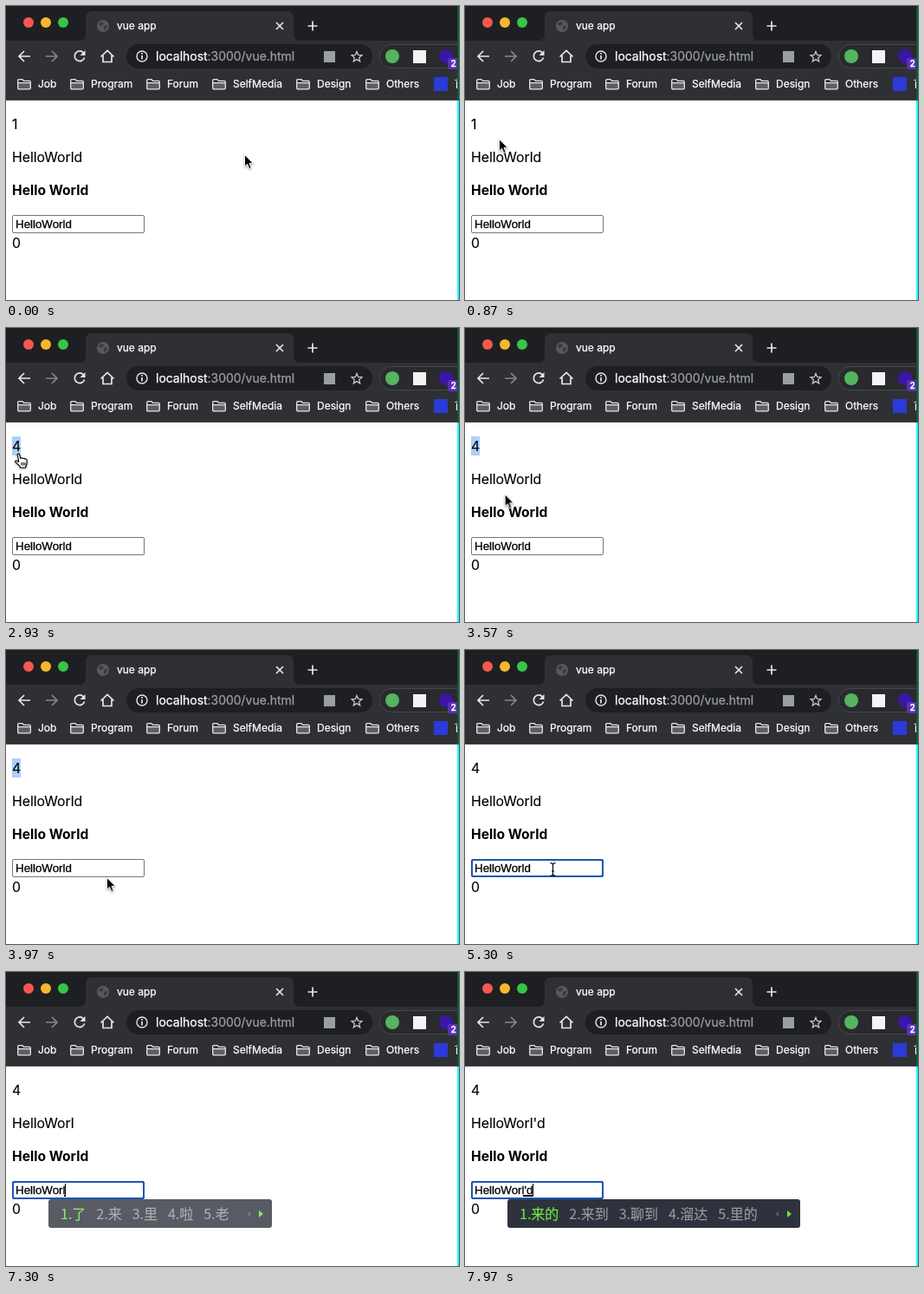
An HTML page that plays this animation: 523 by 339 pixels, repeating every 8 s.

```html
<!DOCTYPE html>
<html lang="en">
<head>
<meta charset="utf-8">
<title>vue app</title>
<style>
html, body { margin: 0; width: 100%; height: 100%; overflow: hidden; background: #fff; }
body { position: relative; font: 15.8px/22px Inter, sans-serif; color: #000; -webkit-text-stroke: .15px; }
svg { display: block; overflow: visible; }
.chrome { position: absolute; left: 0; top: 0; -webkit-text-stroke: 0; }
.chrome text { font: 12px Inter, "Noto Sans CJK SC", sans-serif; fill: #fff; stroke: #fff; stroke-width: .25px; }
.chrome .url { font-size: 13.95px; }
.chrome .path { fill: #9b9ea3; stroke: #9b9ea3; }
.line { fill: none; stroke: #e6e7e9; stroke-width: 1.7; }
.row, .input, .ring, .caret, .ime, .under, .hl, .count { position: absolute; white-space: pre; }
.row { left: 7px; }
.title { font-size: 15.6px; font-weight: 700; -webkit-text-stroke: 0; }

/* every animated part shares one 8 s clock; most change in hard steps */
.count, .hl, .l, .d, .ad, .input, .ring, .caret, .under, .ime, .ptr, .ptr svg {
  animation: 8s step-end infinite;
}

.count { left: 0; top: 0; }
.hl { left: 0; top: -1px; width: 10px; height: 22px; background: #acd0f8; animation-name: hl; }
.c1 { animation-name: c1; } .c2 { animation-name: c2; }
.c3 { animation-name: c3; } .c4 { animation-name: c4; }
@keyframes c1 { 0% { opacity: 1 } 22.875%, to { opacity: 0 } }
@keyframes c2 { 0% { opacity: 0 } 22.875% { opacity: 1 } 29.125%, to { opacity: 0 } }
@keyframes c3 { 0% { opacity: 0 } 29.125% { opacity: 1 } 35.875%, to { opacity: 0 } }
@keyframes c4 { 0% { opacity: 0 } 35.875%, to { opacity: 1 } }
@keyframes hl { 0% { opacity: 0 } 36.25% { opacity: 1 } 54.125%, to { opacity: 0 } }

.l { animation-name: l; } .d { animation-name: d; }
.ad { position: absolute; animation-name: ad; }
@keyframes l { 0% { opacity: 1 } 75.875% { opacity: 0 } 87.875%, to { opacity: 1 } }
@keyframes d { 0% { opacity: 1 } 73.75%, to { opacity: 0 } }
@keyframes ad { 0% { opacity: 0 } 99.125%, to { opacity: 1 } }

.input {
  left: 7px; top: 241px; width: 153px; height: 21px; box-sizing: border-box;
  padding: 2px 3px; border: 1px solid #767676; border-radius: 2px; background: #fff;
  font: 13.333px/15px "Liberation Sans", Arial, sans-serif; -webkit-text-stroke: .3px; animation-name: hover;
}
@keyframes hover {
  0% { border-color: #767676 } 45.5% { border-color: #484848 }
  46.75% { border-color: #767676 } 50%, to { border-color: #484848 }
}
.ring {
  left: 7px; top: 241px; width: 149px; height: 17px;
  border: 2px solid #1b56b6; border-radius: 3px;
  animation-name: ring; animation-timing-function: linear;
}
@keyframes ring { 0%, 54.125% { opacity: 0 } 55.875%, to { opacity: 1 } }

.caret { left: 0; top: 244px; width: 1px; height: 15px; background: #000; animation-name: blink, caret; }
@keyframes blink {
  0% { opacity: 0 } 55.875% { opacity: 1 } 66.25% { opacity: 0 } 72.5% { opacity: 1 }
  78.75% { opacity: 0 } 85% { opacity: 1 } 94.125% { opacity: 0 } 99.125%, to { opacity: 1 }
}
@keyframes caret {
  0% { transform: translateX(76px) } 73.75% { transform: translateX(68px) }
  75.875% { transform: translateX(66px) } 87.875% { transform: translateX(68px) }
  99.125%, to { transform: translateX(78px) }
}
.under { left: 67px; top: 257px; height: 1.6px; background: #000; animation-name: under; }
@keyframes under { 0% { width: 0 } 87.875% { width: 2px } 99.125%, to { width: 11px } }

.ime {
  left: 49px; top: 262px; width: 338px; height: 33px; box-sizing: border-box;
  padding-left: 14px; display: flex; gap: 12px; border-radius: 3px; background: #2e323c; color: #96989d;
  font: 16px/33px "Noto Sans CJK SC", sans-serif; animation-name: wide;
}
.ime b { font-weight: 500; color: #6ee83c; }
.ime svg { position: absolute; right: 9px; top: 13px; }
.ime.short { width: 258px; animation-name: short; animation-timing-function: linear; }
@keyframes short {
  0%, 87.875% { opacity: 0; animation-timing-function: ease-out }
  93.375% { opacity: 1; animation-timing-function: step-end }
  99.625%, to { opacity: 0 }
}
@keyframes wide { 0% { opacity: 0 } 99.625%, to { opacity: 1 } }

.ptr { position: absolute; left: 0; top: 0; animation-name: move; animation-timing-function: linear; }
.ptr svg { position: absolute; left: 0; top: 0; filter: drop-shadow(0 1px 1px #0006); }
.ptr .arrow { animation-name: arrow; }
.ptr .hand { animation-name: hand; }
.ptr .beam { animation-name: beam; filter: none; }
@keyframes move {
  0% { transform: translate(275px, 171px) }
  6.25% { transform: translate(275px, 171px); animation-timing-function: cubic-bezier(.4, .1, .6, 1) }
  10.875% { transform: translate(39px, 153px); animation-timing-function: ease-out }
  15.4% { transform: translate(22px, 148px) }
  16.25% { transform: translate(17px, 145px) }
  17.125%, 43.375% { transform: translate(14px, 145px) }
  43.8% { transform: translate(17px, 148px) }
  45.5% { transform: translate(75px, 236px) }
  46.75% { transform: translate(110px, 262px) }
  47.5%, 49.3% { transform: translate(117px, 264px) }
  49.625% { transform: translate(116px, 262px) }
  51.25%, to { transform: translate(101px, 253px) }
}
@keyframes arrow {
  0% { opacity: 1 } 15.4% { opacity: 0 } 43.8% { opacity: 1 }
  45.5% { opacity: 0 } 46.75% { opacity: 1 } 50%, to { opacity: 0 }
}
@keyframes hand { 0% { opacity: 0 } 15.4% { opacity: 1 } 43.8%, to { opacity: 0 } }
@keyframes beam {
  0% { opacity: 0 } 45.5% { opacity: 1 } 46.75% { opacity: 0 }
  50% { opacity: 1 } 73.75%, to { opacity: 0 }
}
</style>
</head>
<body>
<svg class="chrome" width="523" height="339" viewBox="0 0 523 339">
  <defs>
    <g id="folder">
      <path fill="#e6e7e9" opacity=".25" d="M.7 4.6H15.3V11.8H.7Z"/>
      <path class="line" style="stroke-width:1.3" d="M.7 10.5V2Q.7.7 2 .7H6L7.6 2.4H14Q15.3 2.4 15.3 3.7V10.5Q15.3 11.8 14 11.8H2Q.7 11.8.7 10.5ZM.7 4.6H15.3"/>
    </g>
  </defs>
  <rect width="523" height="40" fill="#1e1f22"/>
  <rect y="40" width="523" height="69" fill="#2f3034"/>
  <rect y="108" width="523" height="1" fill="#46484c"/>
  <path fill="#2f3034" d="M84 40Q92 40 92 32V14Q92 6 100 6H324Q332 6 332 14V32Q332 40 340 40Z"/>
  <circle cx="26" cy="19" r="6" fill="#f6574e"/>
  <circle cx="46" cy="19" r="6" fill="#f5b72e"/>
  <circle cx="66" cy="19" r="6" fill="#35c648"/>

  <circle cx="112" cy="23" r="7" fill="#56585c"/>
  <path fill="#38393d" d="M107 20L111 18 113 20 110 23 108 22ZM113 23L117 22 116 26 113 28Z"/>
  <text x="128" y="27">vue app</text>
  <path class="line" d="M312 19L320 27M320 19L312 27"/>
  <path class="line" d="M348.5 23H359.5M354 17.5V28.5"/>

  <path class="line" d="M28 58H15.5M21 52L15 58 21 64"/>
  <path class="line" style="stroke:#85878b" d="M46 58H58.5M53 52L59 58 53 64"/>
  <path class="line" d="M89.5 54A5.8 5.8 0 1 0 90.6 59.5"/>
  <path fill="#e6e7e9" d="M91.5 51V57H85.5Z"/>
  <path class="line" d="M109.5 58.5L117 51.5 124.5 58.5M112 57V64.5H122V57"/>

  <rect x="139" y="44" width="284" height="28" rx="14" fill="#1e1f22"/>
  <circle class="line" style="stroke-width:1.4" cx="157" cy="58" r="6"/>
  <path class="line" d="M157 57V61.5M157 54V55.7"/>
  <text class="url" x="173" y="63">localhost<tspan class="path">:3000/vue.html</tspan></text>
  <rect x="367" y="52" width="13" height="13" fill="#9a9da2"/>
  <path class="line" style="stroke:#c3c5c8;stroke-width:1.3" d="M405 52.5L406.7 56.4 411 56.8 407.7 59.6 408.7 63.8 405 61.6 401.3 63.8 402.3 59.6 399 56.8 403.3 56.4Z"/>

  <rect x="431.5" y="44.5" width="110" height="27" rx="13.5" fill="#292a2e" stroke="#45474c"/>
  <circle cx="446" cy="58" r="8" fill="#55b45e"/>
  <rect x="470" y="51" width="15" height="15" fill="#f4f4f4"/>
  <circle cx="508" cy="58" r="8" fill="#3b16a6"/>
  <rect x="510" y="60" width="14" height="13" rx="2" fill="#5b30b5"/>
  <text x="513.5" y="70" style="font-size:10px;font-weight:600">2</text>

  <use href="#folder" x="13" y="84"/><text x="37" y="94">Job</text>
  <use href="#folder" x="74" y="84"/><text x="98" y="94">Program</text>
  <use href="#folder" x="162" y="84"/><text x="186" y="94">Forum</text>
  <use href="#folder" x="238" y="84"/><text x="262" y="94">SelfMedia</text>
  <use href="#folder" x="335" y="84"/><text x="359" y="94">Design</text>
  <use href="#folder" x="415" y="84"/><text x="439" y="94">Others</text>
  <rect x="494" y="82" width="16" height="16" fill="#2b3ad8"/>
  <text x="518" y="94">首页</text>

  <rect x="521" width="2" height="109" fill="#0a5c33"/>
  <rect x="521" y="109" width="2" height="230" fill="#12fbff"/>
</svg>

<div class="row" style="top:126px">
  <i class="hl"></i>
  <span class="count c1">1</span><span class="count c2">2</span><span class="count c3">3</span><span class="count c4">4</span>
</div>
<div class="row" style="top:164px">HelloWor<span class="l">l</span><span class="ad">'d</span><span class="d">d</span></div>
<div class="row title" style="top:202px">Hello World</div>
<div class="input">HelloWor<span class="l">l</span><span class="ad">'d</span><span class="d">d</span></div>
<div class="ring"></div>
<div class="under"></div>
<div class="caret"></div>
<div class="row" style="top:263px">0</div>

<div class="ime short"><b>1.了</b><span>2.来</span><span>3.里</span><span>4.啦</span><span>5.老</span>
  <svg width="21" height="8"><path fill="#565a63" d="M5 1V7L1 4Z"/><path fill="#6ee83c" d="M15 0V8L20 4Z"/></svg>
</div>
<div class="ime"><b>1.来的</b><span>2.来到</span><span>3.聊到</span><span>4.溜达</span><span>5.里的</span>
  <svg width="21" height="8"><path fill="#565a63" d="M5 1V7L1 4Z"/><path fill="#6ee83c" d="M15 0V8L20 4Z"/></svg>
</div>

<div class="ptr">
  <svg class="arrow" width="12" height="18"><path stroke="#fff" d="M.5.5V14.2L3.6 11.3 5.8 16.6 8.2 15.6 6 10.4H10.3Z"/></svg>
  <svg class="hand" width="16" height="18" style="left:-4px;top:-1px">
    <path fill="#fff" stroke="#000" stroke-width="1.1" stroke-linejoin="round" d="M4.5 8.5L3.2 2.6C3 1 5 .4 5.5 2L7 6.5C7.5 5.4 9.3 5.5 9.5 6.7 10.2 5.9 11.8 6.2 12 7.3 12.9 6.7 14.2 7.3 14.2 8.5L14 12.5 12.5 17H6.5L5.6 14.8 1 10.7C0 9.3 1.6 8.3 2.8 9.4L4.7 10.6Z"/>
    <path stroke="#000" d="M8 11V14.5M10 11V14.5M12 11V14.5"/>
  </svg>
  <svg class="beam" width="9" height="16" style="left:-4px;top:-8px">
    <path fill="none" stroke="#000" stroke-width="1.1" d="M1.5 .6Q4.5 .6 4.5 2.6 4.5 .6 7.5 .6M4.5 2V14M1.5 15.4Q4.5 15.4 4.5 13.4 4.5 15.4 7.5 15.4M3 10H6"/>
  </svg>
</div>
</body>
</html>
```
